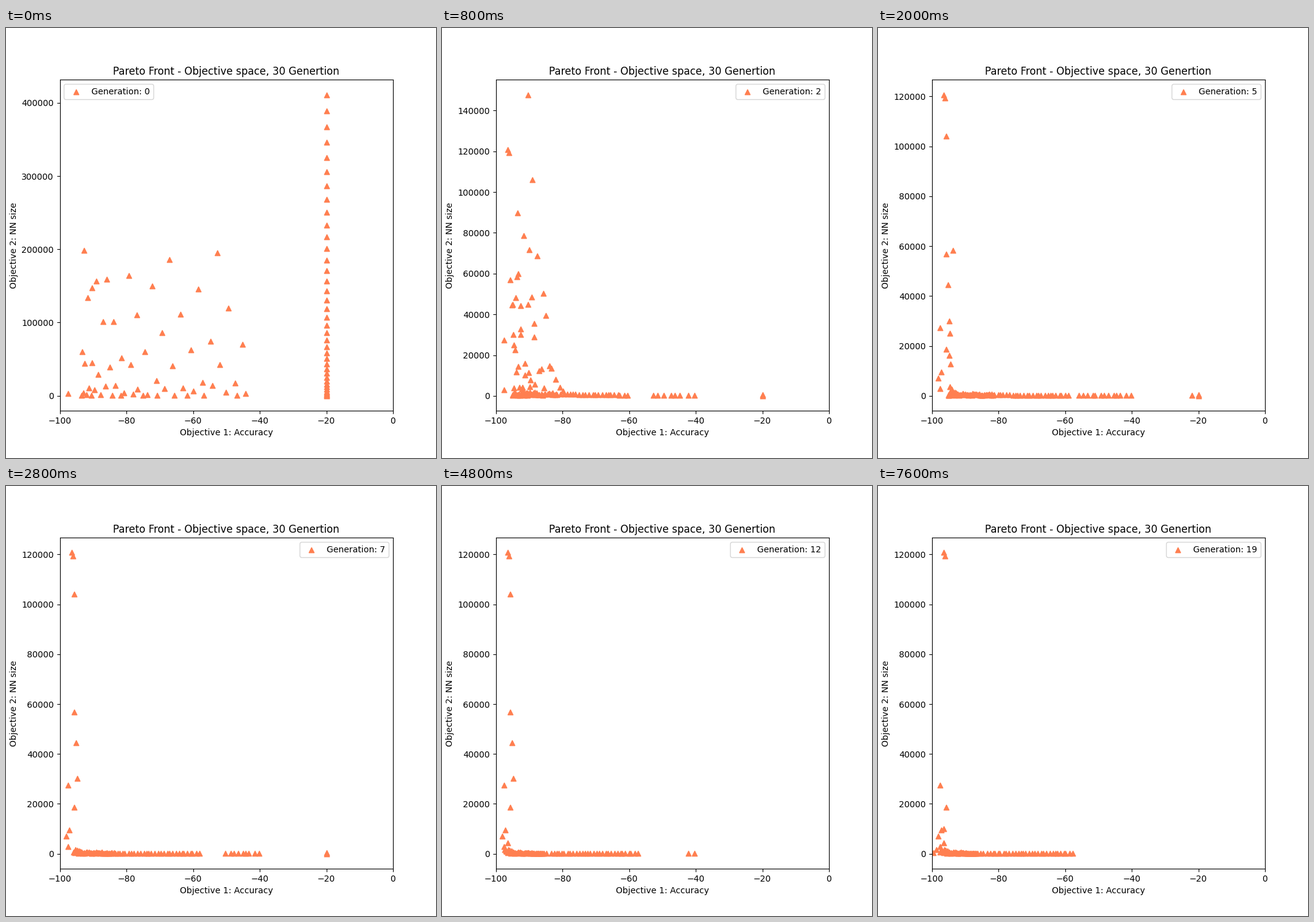
Recreate the animation shown at these times as a matplotlib script. Size 700 px wide and 700 px high, loop 8 s.

```python
import numpy as np
import matplotlib.pyplot as plt
from matplotlib.animation import FuncAnimation

GENERATIONS = 20
INTERVAL = 400
GOLDEN = 0.618034
LAST = GENERATIONS - 1

# Outstanding networks: first and last generation, accuracy, size in thousands
LEADERS = [
    (0, 2, 90.3, 147.8), (0, LAST, 97.6, 2.9),
    (1, 1, 81.3, 201.7), (1, 6, 93.6, 58.4), (1, 13, 95.7, 56.8),
    (1, LAST, 96.4, 120.7), (1, LAST, 96, 119.3), (1, LAST, 97.5, 27.4),
    (2, 12, 94.7, 30.1), (2, 13, 95.1, 44.5),
    (3, 3, 93.3, 127.9), (3, 6, 22, 0.2),
    (3, LAST, 95.7, 18.65), (3, LAST, 97.1, 9.6),
    (4, 13, 95.7, 104), (5, LAST, 98.1, 7.1), (8, LAST, 96.4, 4.3),
    (13, 15, 95.1, 12.7), (14, 18, 95.7, 44),
    (14, LAST, 98.7, 1.6), (14, LAST, 99.5, 0.5), (18, LAST, 96.4, 10),
]

# Newcomers per generation: count, best accuracy, accuracy range, largest size
BIRTHS = [(58, 93.4, 50, 220), (55, 95, 35, 145), (14, 95, 8, 60),
          (14, 95, 8, 40), (4, 95, 2, 30), (3, 95, 2, 6)]


def floor(gen):
    """Size of the smallest network."""
    return np.interp(gen, [5, 7], [0.12, 0.05])


def newcomers(gen):
    """A cloud with many good and small networks and few bad or large ones."""
    count, best, spread, largest = BIRTHS[gen]
    rng = np.random.default_rng(gen + 3)
    index = np.arange(count)
    rank = (index + rng.random(count)) / count
    share = (index * GOLDEN + 0.15 * rng.random(count)) % 1
    return best - spread * rank ** 1.5, 0.3 + largest * share ** 3


def survivors(gen):
    """Selection lets a network be large only if it is accurate enough."""
    bar = np.interp(gen, [0, 1, 2, 3, 4, 5, 9], [0, 59, 78, 87, 93, 93.2, 98])
    slope = min(5 * 2.0 ** (gen - 1), 20)
    points = []
    for born in range(min(gen + 1, len(BIRTHS))):
        for acc, size in zip(*newcomers(born)):
            if gen == 0 or size < min(slope * (acc - bar), 115):
                points.append((acc, size))
    return points


def untrained(gen):
    """Networks stuck at 20 % accuracy, dying out over time."""
    if gen > 11:
        return []
    count, largest = [(39, 411.2), (6, 2), (2, 0.35)][min(gen, 2)]
    sizes = floor(gen) + largest * np.linspace(0, 1, count) ** 2.1
    return [(20, size) for size in sizes]


def jittered(low, high, count, seed):
    """Evenly spread values, each moved a little from its place."""
    shift = np.random.default_rng(seed).uniform(-0.4, 0.4, 60)[:count]
    return low + (high - low) * (np.arange(count) + 0.5 + shift) / max(count, 1)


def front(gen):
    """The flat front: crowded at high accuracy, thinning out to the right."""
    if gen < 2:
        return []

    def at(*values):
        return np.interp(gen, [3, 5, 9, 15], values)

    def size(acc, factor=1.0):
        height, width = at(2, 1.4, 1.3, 1.3), at(18, 12, 5, 5)
        return floor(gen) + factor * height * np.exp((acc - 97) / width)

    edge = at(82, 81.5, 85, 86.5)
    crowd = jittered(edge, at(94, 94.7, 97.3, 97.5), int(at(26, 44, 46, 48)), 1)
    factors = np.random.default_rng(8).uniform(0.12, 1.4, 60)
    middle = jittered(at(60.2, 58.8, 56.8, 57.5), edge, int(at(23, 26, 32, 34)), 2)
    tail = jittered(40, at(54, 56.5, 45, 42), int(at(8, 13, 5, 0)), 3)
    points = [(acc, size(acc, f)) for acc, f in zip(crowd, factors)]
    return points + [(acc, size(acc)) for acc in (*middle, *tail)]


def population(gen):
    leaders = [(acc, size) for first, last, acc, size in LEADERS
               if first <= gen <= last]
    points = leaders + survivors(gen) + untrained(gen) + front(gen)
    return np.array(points) * (-1, 1000)


fig, ax = plt.subplots(figsize=(7, 7), dpi=100)


def draw(gen):
    ax.clear()
    x, y = population(gen).T
    ax.scatter(x, y, marker="^", color="coral", label=f"Generation: {gen}")
    bottom = 1000 * floor(gen)
    margin = 0.05 * (y.max() - bottom)
    ax.set_xlim(-100, 0)
    ax.set_ylim(bottom - margin, y.max() + margin)
    ax.set_title("Pareto Front - Objective space, 30 Genertion")
    ax.set_xlabel("Objective 1: Accuracy")
    ax.set_ylabel("Objective 2: NN size")
    ax.legend(loc="upper left" if gen == 0 else "upper right")
    return []


animation = FuncAnimation(fig, draw, frames=GENERATIONS, interval=INTERVAL,
                          init_func=lambda: draw(0), repeat=True,
                          repeat_delay=0, blit=False)
plt.show()
```
